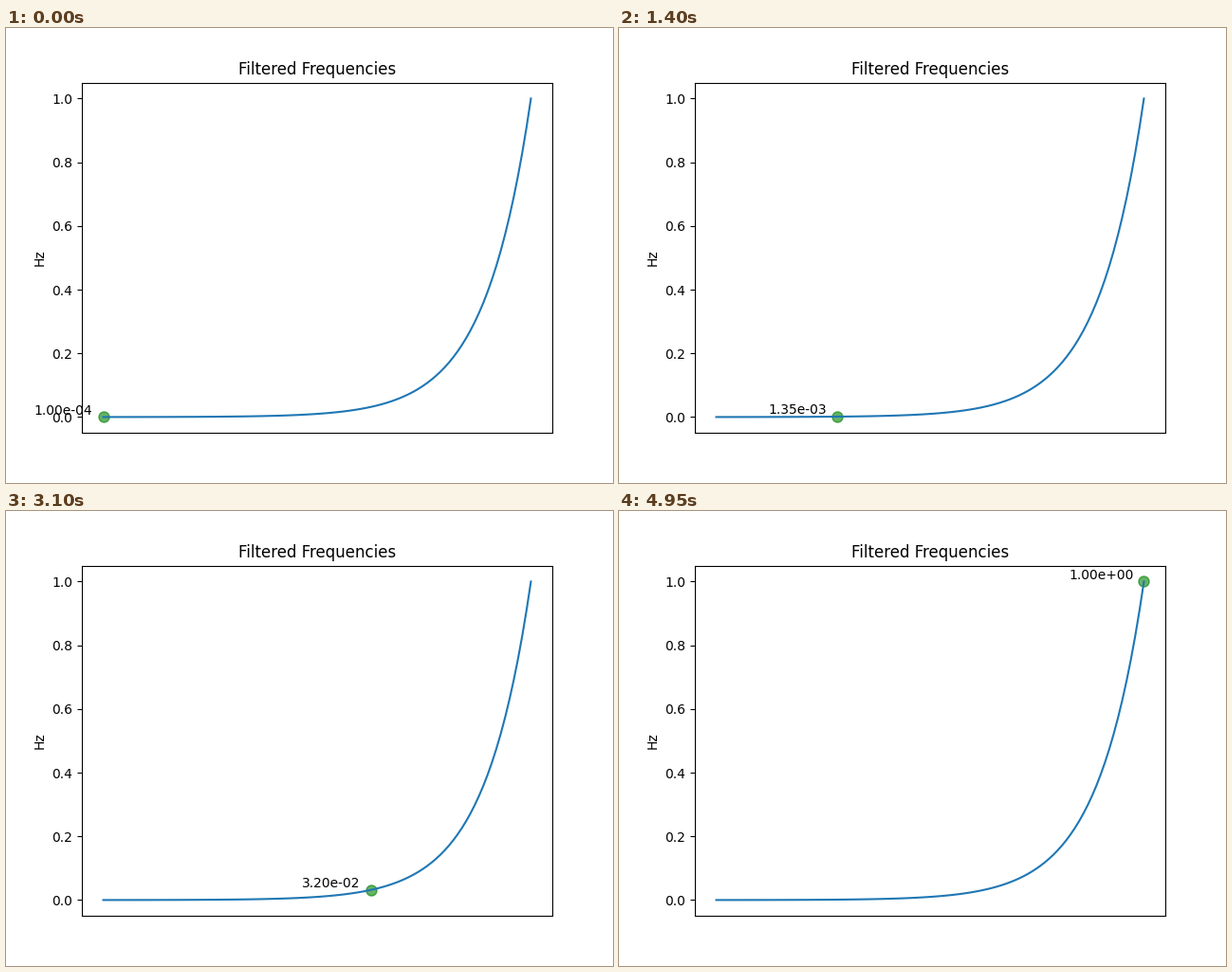
Recreate the animation shown at these times as a matplotlib script. Size 640x480 px, loop 6950 ms.

```python
import matplotlib.pyplot as plt
import numpy as np
from matplotlib.animation import FuncAnimation

POINTS = 100
HOLD = 39  # extra ticks the last point stays on screen
STEP_MS = 50

freqs = np.logspace(-4, 0, POINTS)
index = np.arange(POINTS)

fig, ax = plt.subplots(figsize=(6.4, 4.8), dpi=100)
ax.plot(index, freqs)
ax.set_title("Filtered Frequencies")
ax.set_ylabel("Hz")
ax.set_xticks([])

dot = ax.scatter(index[:1], freqs[:1], s=64, c="g", alpha=0.6)
label = ax.annotate("", xy=(0, freqs[0]), xytext=(-8, 2),
                    textcoords="offset points", ha="right")


def update(tick):
    i = min(tick, POINTS - 1)
    pos = (index[i], freqs[i])
    dot.set_offsets([pos])
    label.xy = pos
    label.set_text(f"{freqs[i]:.2e}")
    return dot, label


anim = FuncAnimation(fig, update, frames=POINTS + HOLD, interval=STEP_MS,
                     repeat=True, repeat_delay=0)
plt.show()
```
